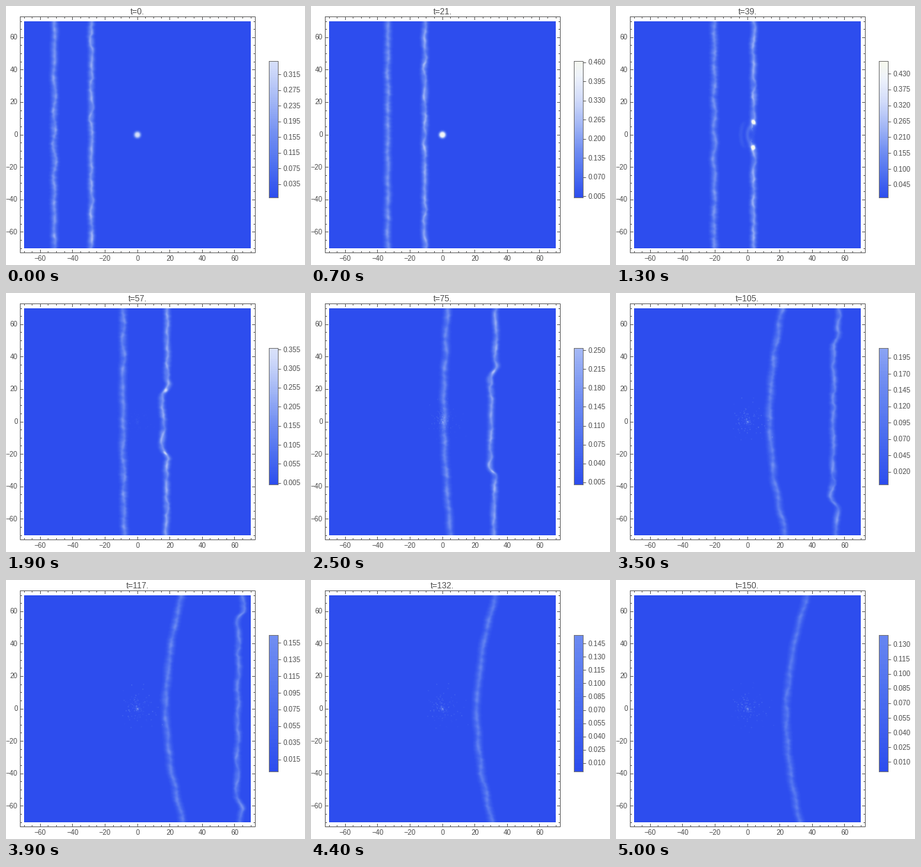
Animation, 430 px wide and 372 px high, one loop 5.1 s. Source, as a matplotlib script:

```python
import numpy as np
import matplotlib.pyplot as plt
from matplotlib.animation import FuncAnimation
from matplotlib.colors import LinearSegmentedColormap

W, H, DPI = 430, 372, 100
FRAMES, INTERVAL = 51, 100
SIZE = 326                      # side of the square field in pixels
X0, Y0 = 189, 185               # pixel position of the plot's origin
SCALE = SIZE / 140
LEVEL = 0.005                   # contour spacing
BAR_TOP, BAR_BOTTOM = 79, 276
GREY, INK = "#666666", "#4c4c4c"

plt.rcParams["font.family"] = "Liberation Sans"
rng = np.random.default_rng(12)

cmap = LinearSegmentedColormap.from_list("density", [
    (0.179, 0.305, 0.934), (0.309, 0.442, 0.941), (0.453, 0.567, 0.950),
    (0.642, 0.720, 0.965), (0.820, 0.859, 0.983), (0.936, 0.952, 0.985),
    (0.984, 0.988, 0.910)], N=100)

axis = (np.arange(SIZE) + 0.5) / SCALE - 70
X, Y = np.meshgrid(axis, axis[::-1])
R = np.hypot(X, Y)
y = axis[::-1]

# Number of contour levels: (frame, count) key points.
LEVEL_KEYS = [(0, 70), (7, 93), (10, 96), (13, 95), (18, 75),
              (25, 51), (32, 49), (39, 33), (50, 28)]


def ramp(t, start, end):
    u = np.clip((t - start) / (end - start), 0, 1)
    return u * u * (3 - 2 * u)


def ripples(count, short, long):
    """Random sine components with wavelengths between short and long."""
    k = 2 * np.pi / rng.uniform(short, long, count)
    return list(zip(k, rng.uniform(-0.12, 0.12, count),
                    rng.uniform(0, 2 * np.pi, count)))


def ripple(parts, s, t):
    total = sum(np.sin(k * s + w * t + p) for k, w, p in parts)
    return total / np.sqrt(len(parts) / 2)


def make_band():
    return {"sway": ripples(6, 14, 45), "rough": ripples(6, 2, 6),
            "core": ripples(6, 9, 28), "grain": ripples(7, 4, 18)}


lead, trail = make_band(), make_band()

SPECKS = 150
speck_r = np.abs(rng.normal(0, 7, SPECKS))
speck_a = rng.uniform(0, 2 * np.pi, SPECKS)
speck_v = rng.uniform(0.008, 0.04, SPECKS)
speck_p = rng.uniform(0, 2 * np.pi, SPECKS)


def draw_band(band, center, t, amp, width):
    """Return a soft ragged band around center(y), and the distance to it."""
    mid = center + 0.22 * ripple(band["sway"], y, t) \
        + 0.08 * ripple(band["rough"], y, t)
    d = X - mid[:, None]
    grain = ripple(band["grain"], Y + 0.3 * np.clip(d, -4, 4), t)
    off = 0.2 + 0.45 * ripple(band["core"], y, t)[:, None]
    body = 0.62 * np.exp(-np.abs(d / width) ** 2.3)
    core = 0.32 * np.exp(-((d - off) / (0.45 * width)) ** 2)
    return amp * (body + core) * (0.95 + 0.13 * grain), d


def lead_center(t, h):
    base = -28.5 + 0.842 * t - 0.00041 * t * t
    tilt = 0.009 * y * ramp(t, 40, 75)
    edge = np.abs(y) - h
    lag = 2.4 / (1 + np.exp(np.clip(edge / 1.1, -40, 40)))
    lag += 0.7 * np.exp(-((edge + 4) / 4) ** 2)
    lag -= 0.8 * np.exp(-((edge - 3.5) / 3) ** 2)
    return base + tilt - lag * ramp(t, 33, 55)


def trail_center(t):
    u = y / 70
    base = -51.4 + 0.893 * t - 0.0026 * t * t
    bow = 10.5 * ramp(t, 45, 125) * np.abs(u) ** 1.8
    tilt = 2.9 * ramp(t, 105, 150) - 0.9 * ramp(t, 45, 75)
    return base + bow + tilt * u


def add_specks(field, t):
    grow = ramp(t, 45, 95)
    if grow == 0:
        return
    r = speck_r * (0.75 + 0.25 * t / 150)
    cols = ((r * np.cos(speck_a) + 70) * SCALE).astype(int)
    rows = ((70 - r * np.sin(speck_a)) * SCALE).astype(int)
    light = grow * speck_v * (1 + 0.5 * np.sin(0.1 * t + speck_p))
    for dr, dc, k in ((0, 0, 1), (0, 1, 0.6), (1, 0, 0.6), (1, 1, 0.4)):
        np.add.at(field, (rows + dr, cols + dc), k * light)
    field += 0.09 * ramp(t, 90, 117) * np.exp(-R ** 2 / 0.4)


def density(t, top):
    h = max(3, 6.5 + 0.64 * (t - 37))
    front, d = draw_band(lead, lead_center(t, h), t,
                         0.21 - 0.08 * ramp(t, 60, 130), 2.0)
    back, _ = draw_band(trail, trail_center(t), t,
                        0.18 - 0.07 * t / 150, 2.15 + 0.002 * t)

    # The obstacle opens a gap in the front, which heals later.
    gap = 0.8 * ramp(t, 31, 38) * (1 - ramp(t, 40, 62))
    front *= 1 - gap * np.exp(-(Y / 6) ** 4)
    field = front + back

    if t > 31:
        edge = np.abs(Y) - h
        side = d - 0.3
        hot = 0.42 * ramp(t, 31, 38) * np.exp(-max(0, t - 39) / 14)
        hot += 0.05 * (1 - ramp(t, 90, 125))
        field += hot * np.exp(-((side + edge) / 1.3) ** 2
                              - ((side - edge) / 2.2) ** 2)
        fade = ramp(t, 31, 38) * (1 - ramp(t, 40, 60))
        for radius, glow in ((3, 0.07), (7, 0.035)):
            ring = np.hypot(X - 3, Y * 0.6) - radius
            field += (glow * fade * np.exp(-(ring / 1.3) ** 2)
                      * np.exp(-(Y / 8) ** 6) * (d < 0))

    dot = top * (1 - ramp(t, 30, 37))
    field = np.maximum(field, dot * np.exp(-(R / 2.1) ** 3))
    add_specks(field, t)
    return np.clip(field, 0, top - 0.001)


def legend_ticks(n):
    """Evenly strided contour indices, centred between 0 and n."""
    count = 8
    stride = n // 7 if n % 7 == 2 else n // 8
    while n - stride * (count - 1) > 2 * stride:
        count += 1
    first = (n - stride * (count - 1) + 1) // 2
    return [first + stride * i for i in range(count)]


fig = plt.figure(figsize=(W / DPI, H / DPI), dpi=DPI, facecolor="white")
ax = fig.add_axes([0, 0, 1, 1])
ax.axis("off")


def line(xs, ys, color=GREY):
    return ax.plot(xs, ys, color=color, lw=72 / DPI, snap=False,
                   solid_capstyle="butt", solid_joinstyle="miter")[0]


def box(left, top, right, bottom, color=GREY):
    line([left, right, right, left, left], [top, top, bottom, bottom, top],
         color)


def label(x, ypos, text, px=10, **kw):
    return ax.text(x, ypos, text, fontsize=px * 72 / DPI, color=INK, **kw)


def crisp(v):
    return np.floor(v) + 0.5


def density_image(shape, extent):
    return ax.imshow(np.zeros(shape), cmap=cmap, vmin=0, vmax=0.5,
                     extent=extent, interpolation="nearest", aspect="auto")


picture = density_image((SIZE, SIZE), (26, 352, 348, 22))
bar = density_image((2, 1), (378, 392, BAR_BOTTOM, BAR_TOP))
ax.set_ylim(H, 0)

LEFT, RIGHT, TOP, BOTTOM = 20.5, 358.5, 15.5, 354.5
box(LEFT, TOP, RIGHT, BOTTOM)
for v in range(-70, 71, 5):
    major = v % 20 == 0
    size = 4.5 if major else 2.5
    px, py = crisp(X0 + v * SCALE), crisp(Y0 - v * SCALE)
    line([px, px], [BOTTOM, BOTTOM - size])
    line([px, px], [TOP, TOP + size])
    line([LEFT, LEFT + size], [py, py])
    line([RIGHT, RIGHT - size], [py, py])
    if major:
        text = str(v).replace("-", "\u2212")
        label(X0 + v * SCALE, 363, text, ha="center", va="center")
        label(17, Y0 - v * SCALE, text, ha="right", va="center")

box(378.5, BAR_TOP + 0.5, 391.5, BAR_BOTTOM - 0.5, "#777777")
title = label(X0, 12, "", 12, ha="center", va="baseline")
marks = [line([391, 395.5], [0, 0]) for _ in range(12)]
values = [label(399, 0, "", va="center") for _ in marks]


def update(frame):
    t = 3 * frame
    n = int(round(np.interp(frame, *zip(*LEVEL_KEYS))))
    picture.set_data(density(t, n * LEVEL))
    bar.set_data((np.arange(n)[::-1, None] + 0.5) * LEVEL)
    title.set_text(f"t={t}.")

    ticks = legend_ticks(n)
    short = all(k % 2 == 0 for k in ticks)
    for i, (mark, value) in enumerate(zip(marks, values)):
        shown = i < len(ticks)
        mark.set_visible(shown)
        value.set_visible(shown)
        if shown:
            py = BAR_BOTTOM - (BAR_BOTTOM - BAR_TOP) * ticks[i] / n
            mark.set_ydata([crisp(py)] * 2)
            value.set_y(py)
            value.set_text(f"{ticks[i] * LEVEL:.{2 if short else 3}f}")

    # Shorter legend labels move the whole layout to the right.
    shift = 3 if short else 0
    ax.set_xlim(-shift, W - shift)
    return picture, bar, title


anim = FuncAnimation(fig, update, frames=FRAMES, interval=INTERVAL,
                     repeat=True, repeat_delay=0, blit=False)
plt.show()
```
